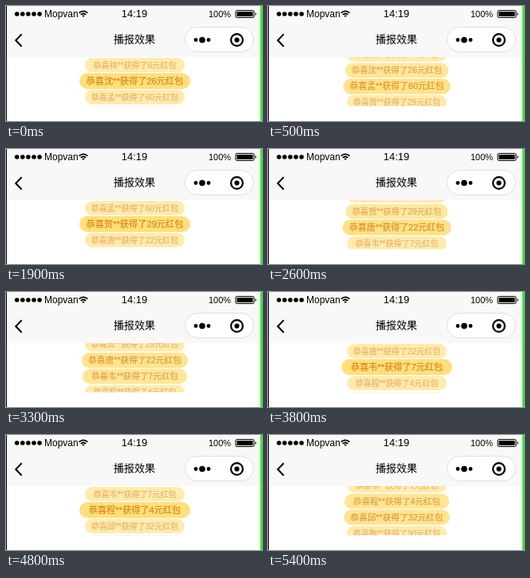
Write an HTML page that moves like this. It is 321 px wide and 144 px high and loops after 5500 ms.

```html
<!DOCTYPE html>
<html lang="zh">
<head>
<meta charset="utf-8">
<title>播报效果</title>
<style>
  html, body { margin: 0; width: 100%; height: 100%; overflow: hidden; background: #fff; }
  svg { display: block; }
  text { font-family: "Liberation Sans", "Noto Sans CJK SC", "Noto Sans CJK", sans-serif; }
  .mid { text-anchor: middle; }
  .line { fill: none; stroke: #000; }
  #list text { font-size: 11.2px; fill: #de8412; stroke: #de8412; stroke-width: .2; }
</style>
</head>
<body>
<svg width="321" height="144" viewBox="0 0 321 144">
  <clipPath id="window"><rect x="0" y="64" width="321" height="61.5"/></clipPath>
  <rect width="321" height="144" fill="#fff"/>
  <rect width="321" height="64" fill="#f8f8f8"/>

  <g id="signal"></g>
  <text x="48" y="14" font-size="12">Mopvan</text>
  <g class="line" stroke-width="1.7">
    <path d="M91.6 8.6Q97 4 102.4 8.6M93.7 10.9Q97 8.1 100.3 10.9"/>
    <path d="M95.2 12L97 14L98.8 12Q97 10.8 95.2 12Z" fill="#000" stroke="none"/>
  </g>
  <text class="mid" x="161" y="14" font-size="13">14:19</text>
  <text x="254" y="14" font-size="11">100%</text>
  <rect class="line" x="288" y="5.5" width="23" height="9" rx="1.5"/>
  <rect x="289.5" y="7" width="20" height="6" rx=".5"/>
  <path d="M312.5 8Q315 10 312.5 12Z"/>

  <path class="line" d="M19.7 35.3L12.3 43L19.7 50.7" stroke-width="2"/>
  <text class="mid" x="161" y="46" font-size="13">播报效果</text>
  <rect x="224.5" y="26.5" width="86" height="31" rx="15.5" fill="#fff" stroke="#dfdfdf"/>
  <circle cx="238" cy="42.5" r="2.4"/>
  <circle cx="246" cy="42.5" r="3.8"/>
  <circle cx="254" cy="42.5" r="2.4"/>
  <circle class="line" cx="289.5" cy="42.5" r="7.4" stroke-width="2.2"/>
  <circle cx="289.5" cy="42.5" r="3.1"/>

  <g clip-path="url(#window)"><g id="list"></g></g>
  <rect width="1" height="144"/>
  <rect x="319" width="2" height="144" fill="#0f0"/>
</svg>
<script>
const LOOP = 5500, STEP = 100, ROW = 20;
const entries = [
  ["林", 6], ["沈", 26], ["孟", 60], ["贺", 29], ["唐", 22],
  ["韦", 7], ["程", 4], ["邱", 32], ["陶", 90]
];
// Start and duration of each one-row scroll
const scrolls = [[0, 800], [950, 900], [2000, 800], [3000, 800], [4000, 800], [5000, 800]];

function add(parent, tag, attrs, content = "") {
  const node = document.createElementNS(parent.namespaceURI, tag);
  for (const key in attrs) node.setAttribute(key, attrs[key]);
  node.textContent = content;
  return parent.appendChild(node);
}

const signal = document.getElementById("signal");
for (let i = 0; i < 5; i++) add(signal, "circle", { cx: 13.7 + i * 7.1, cy: 10, r: 2.8 });

const list = document.getElementById("list");
const pills = entries.map(([name, amount]) => {
  const pill = add(list, "g", {});
  add(pill, "rect", { x: -69.5, y: -10, width: 139, height: 20, rx: 10, fill: "#ffe07c" });
  add(pill, "text", { class: "mid", y: 4 }, `恭喜${name}**获得了${amount}元红包`);
  return pill;
});

const clamp = x => Math.min(1, Math.max(0, x));
const ease = x => x + 0.2 * x * (1 - x);

function draw(time) {
  const position = scrolls.reduce(
    (sum, [start, duration]) => sum + ease(clamp((time - start) / duration)), 1);
  pills.forEach((pill, i) => {
    const offset = i - position;
    const focus = clamp(1 - Math.abs(offset));
    pill.setAttribute("transform",
      `translate(161.5 ${94 + offset * ROW}) scale(${0.9 + 0.1 * focus})`);
    pill.setAttribute("opacity", 0.63 + 0.37 * focus);
  });
}

const began = performance.now();
function tick() {
  const elapsed = (performance.now() - began) % LOOP;
  draw(Math.floor(elapsed / STEP) * STEP);
  requestAnimationFrame(tick);
}
tick();
</script>
</body>
</html>
```
